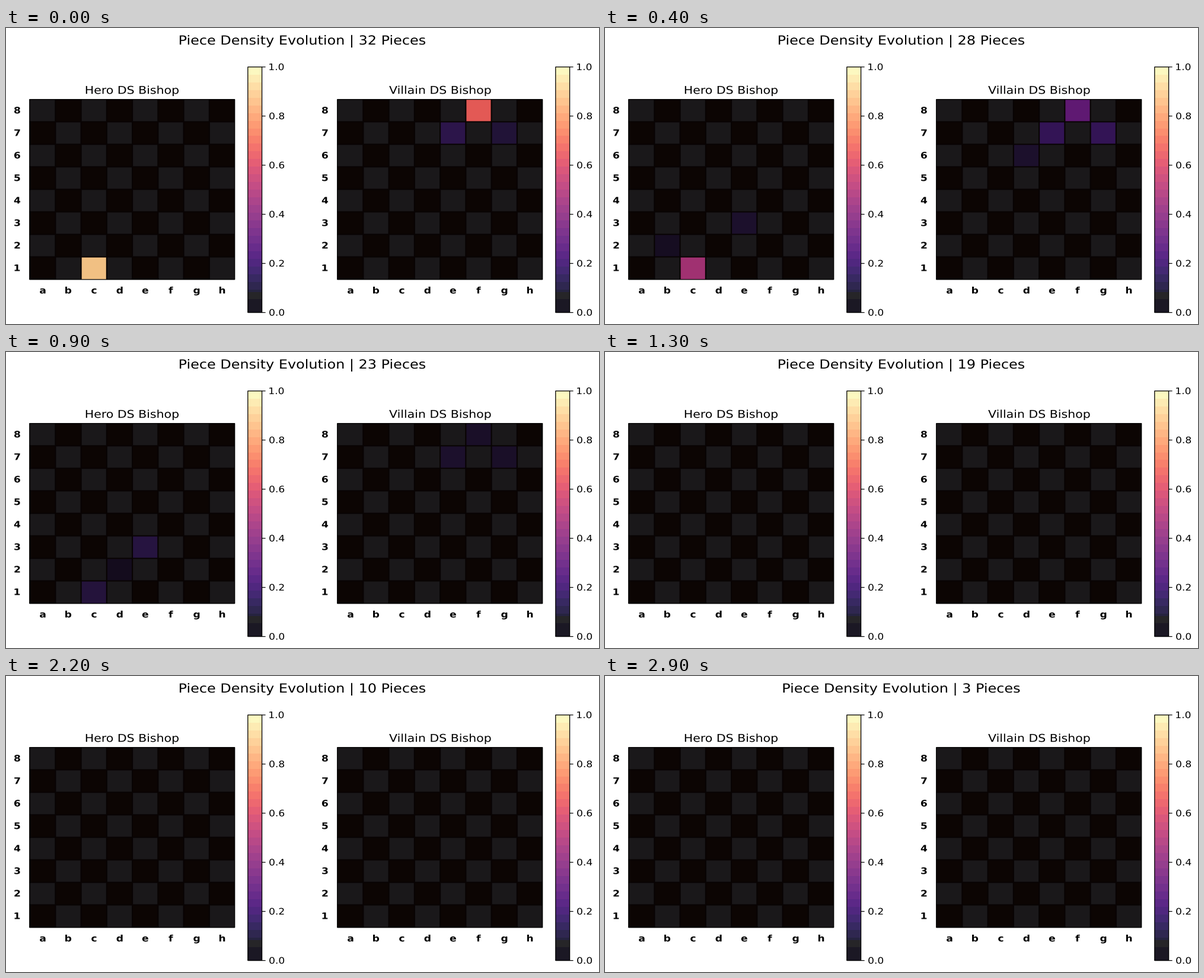
A matplotlib script for the animation above (3 s loop, 1000x500 px).

```python
import numpy as np
import matplotlib.pyplot as plt
from matplotlib.animation import FuncAnimation
from matplotlib.patches import PathPatch, Rectangle
from matplotlib.textpath import TextPath
from matplotlib.transforms import Affine2D

W, H, PX = 1000, 500, 0.72          # stage size, points per pixel
SX, SY = 1.708, 1.512               # pixels per point, across and down
FRAMES, START = 30, 32
ALPHA = 0.9
LIGHT = np.array([255, 240, 232]) / 255
DARK = np.array([120, 50, 0]) / 255
GRID = (8 / 255, 3 / 255, 3 / 255)
TOP, CELL_W, CELL_H = 120.6, 43.25, 38.03
BANDS, BAR_TOP, BAR_BOTTOM = 32, 65.8, 480.6

# Share of games with the piece on each square, at a few frames
KEYS = [0, 4, 7, 9, 13]
HERO = {
    "c1": [0.9, 0.46, 0.15, 0.12, 0],
    "b2": [0, 0.07, 0, 0, 0],
    "d2": [0, 0, 0.065, 0.06, 0],
    "e3": [0, 0.09, 0.12, 0.125, 0],
}
VILLAIN = {
    "f8": [0.66, 0.28, 0.12, 0.085, 0],
    "e7": [0.145, 0.165, 0.15, 0.09, 0],
    "g7": [0.11, 0.165, 0.12, 0.085, 0],
    "d6": [0, 0.09, 0.065, 0, 0],
}

fig = plt.figure(figsize=(W / 100, H / 100), dpi=100, facecolor="white")
ax = fig.add_axes([0, 0, 1, 1])
ax.set(xlim=(0, W), ylim=(H, 0))
ax.axis("off")


def blend(value, under):
    top = np.array(plt.cm.magma(value)[:3])
    return ALPHA * top + (1 - ALPHA) * under


def text_path(s, x, baseline, size, weight="normal", align=0.5):
    path = TextPath((0, 0), s, size=size,
                    prop={"family": "DejaVu Sans", "weight": weight})
    box = path.get_extents()
    anchor = box.x0 + align * box.width
    place = Affine2D().translate(-anchor, 0).scale(SX, -SY).translate(x, baseline)
    return place.transform_path(path)


def text(*args, **kwargs):
    patch = PathPatch(text_path(*args, **kwargs), fc="black", lw=0, zorder=5)
    return ax.add_patch(patch)


def rect(x, y, w, h, color, **kwargs):
    return ax.add_patch(Rectangle((x, y), w, h, fc=color, lw=0, **kwargs))


def line(xs, ys, width, color="black"):
    ax.plot(xs, ys, color=color, lw=width * PX, zorder=3,
            solid_capstyle="butt", snap=False)


def outline(x, y, w, h, width):
    ax.add_patch(Rectangle((x, y), w, h, fill=False, ec="black",
                           lw=width * PX, zorder=4, snap=False))


def draw_board(left, title, squares):
    width, height = 8 * CELL_W, 8 * CELL_H
    cells = {}
    for row in range(8):
        for col in range(8):
            under = DARK if (row + col) % 2 else LIGHT
            name = "abcdefgh"[col] + str(8 - row)
            cells[name] = rect(left + col * CELL_W, TOP + row * CELL_H,
                               CELL_W, CELL_H, blend(0, under))
    for k in range(1, 8):
        x, y = left + k * CELL_W + 0.4, TOP + k * CELL_H - 0.2
        line([x, x], [TOP, TOP + height], 2.1, GRID)
        line([left, left + width], [y, y], 2, GRID)
    outline(left, TOP, width, height, 1.25)

    text(title, left + width / 2 + 0.2, 111.2, 12)
    for k in range(8):
        text(str(8 - k), left - 20.8, TOP + (k + 0.5) * CELL_H + 4.7,
             10, weight="bold")
        text("abcdefgh"[k], left + (k + 0.5) * CELL_W + 0.5, 448.4,
             10, weight="bold")
    return [(cells[name], values) for name, values in squares.items()]


def draw_colorbar(left):
    width, height = 23.8, BAR_BOTTOM - BAR_TOP

    def band(low, high, color):
        rect(left, BAR_BOTTOM - high * height, width, (high - low) * height,
             color, antialiased=False)

    for k in range(BANDS):
        band(k / BANDS, (k + 1) / BANDS,
             blend((k + 0.5) / BANDS, np.ones(3)))
    band(0.055, 0.084, "#262528")
    band(0, 0.055, "#1b1824")
    outline(left, BAR_TOP, width, height, 1.3)
    for k in range(6):
        y = BAR_BOTTOM - k / 5 * height
        line([left + width, left + width + 6], [y, y], 1.2)
        text(f"{k / 5:.1f}", left + width + 12.6, y + 5.3, 10, align=0)


tracked = draw_board(39.7, "Hero DS Bishop", HERO)
tracked += draw_board(558.7, "Villain DS Bishop", VILLAIN)
draw_colorbar(407.8)
draw_colorbar(926.8)
heading = text("Piece Density Evolution", 500, 28, 14)


def update(frame):
    label = f"Piece Density Evolution | {START - frame} Pieces"
    heading.set_path(text_path(label, 500, 28, 14))
    for cell, values in tracked:
        value = np.interp(frame, KEYS, values)
        cell.set_facecolor(blend(value if value > 0.035 else 0, DARK))
    return [heading] + [cell for cell, _ in tracked]


anim = FuncAnimation(fig, update, frames=FRAMES, interval=100,
                     repeat=True, repeat_delay=0, blit=False)
plt.show()
```
